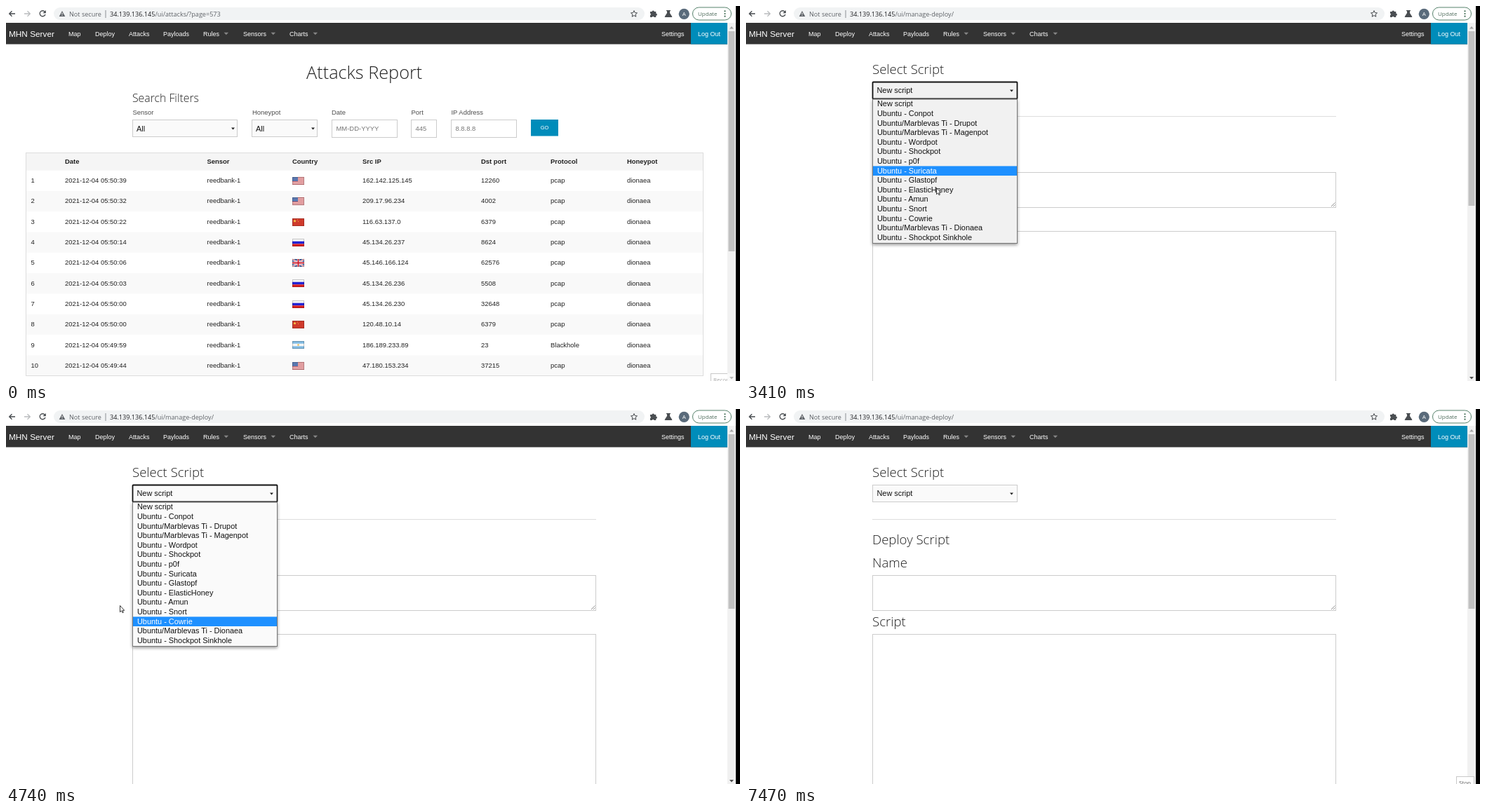
An HTML page for the animation above (7550 ms loop, 1046 by 535 pixels).

```html
<!DOCTYPE html>
<html lang="en">
<head>
<meta charset="utf-8">
<title>Attack report and deploy page</title>
<style>
  html, body { margin: 0; width: 100%; height: 100%; overflow: hidden; background: #fff; }
  svg { display: block; width: 1046px; height: 535px; }
  text { font-family: "Liberation Sans", Arial, sans-serif; font-size: 9.45px; fill: #222; white-space: pre; }
  .ui { font-family: "Open Sans", "Noto Sans", sans-serif; font-size: 9.1px; fill: #5f6368; }
  .small { font-size: 8px; }
  .head { font-family: "Open Sans", "Noto Sans", sans-serif; font-weight: 300; font-size: 18.6px; }
  .h2 { font-size: 25.3px; text-anchor: middle; }
  .h4 { font-size: 15.8px; }
  .nav { font-size: 9px; fill: #fff; }
  .brand { font-size: 11.8px; fill: #fff; }
  .label { fill: #4d4d4d; }
  .hint { fill: #757575; }
  .b { font-weight: bold; }
  .pick { font-size: 10.9px; fill: #111; }
  .on { fill: #fff; }
  .line { fill: none; stroke: #45494d; stroke-width: 1.3; }
</style>
</head>
<body>
<svg id="stage" viewBox="0 0 1046 535"></svg>
<script>
const LOOP = 7550, TICK = 1000 / 15;
const HOST = '34.139.136.145';

const text = (x, y, s, cls = '', extra = '') => `<text x="${x}" y="${y}" class="${cls}" ${extra}>${s}</text>`;
const rect = (x, y, w, h, fill, extra = '') =>
  `<rect x="${x}" y="${y}" width="${w}" height="${h}" fill="${fill}" ${extra}/>`;
const box = (x, y, w, h, fill = '#fff', stroke = '#ccc', extra = '') =>
  rect(x + .5, y + .5, w - 1, h - 1, fill, `stroke="${stroke}" ${extra}`);
const path = (d, extra = '') => `<path d="${d}" ${extra}/>`;
const group = (id, body) => `<g id="${id}">${body}</g>`;
const caret = (x, y, w, h, fill) => path(`M${x} ${y}h${w}l${-w / 2} ${h}z`, `fill="${fill}"`);

// Menu entries: label, x, right edge of the hover area, caret x
const menu = [
  ['Map', 89, 117], ['Deploy', 127, 165], ['Attacks', 175, 214], ['Payloads', 224, 271],
  ['Rules', 281, 327, 310.5], ['Sensors', 338, 394, 377.5], ['Charts', 404, 454, 437.5], ['Settings', 934, 976]
];

function browserBar() {
  return rect(0, 0, 1040, 24, '#fff') + rect(68, 2, 842, 18, '#f1f3f4', 'rx="9"') +
    path('M13 11H5M8.5 7.2L4.7 11l3.8 3.8', 'class="line"') +
    path('M26 11h8M30.5 7.2l3.8 3.8-3.8 3.8', 'class="line" style="stroke:#babcbe"') +
    group('reload', path('M55.3 8.2A4 4 0 1 0 56 12', 'class="line"') + path('M56.8 6v4.3h-4.3z', 'fill="#45494d"')) +
    group('stop', path('M48.5 7.5l7 7m0-7l-7 7', 'class="line"')) +
    path('M80 7l4.3 8h-8.6z', 'fill="#5f6368"') + rect(79.5, 9.6, 1, 2.6, '#fff') + rect(79.5, 13, 1, 1, '#fff') +
    text(90, 14.5, 'Not secure', 'ui') + rect(141.5, 6, 1, 11, '#8b8f93') +
    `<text x="148" y="14.5" class="ui"><tspan fill="#202124">${HOST}</tspan><tspan id="url"></tspan></text>` +
    path('M895 6.6l1.3 3 3.2.3-2.4 2.1.7 3.2-2.8-1.7-2.8 1.7.7-3.2-2.4-2.1 3.2-.3z', 'class="line" style="stroke-width:1"') +
    path('M918 8h2.6a1.6 1.6 0 0 1 3.2 0h2.5v2.6a1.6 1.6 0 0 1 0 3.2V16h-2.7a1.6 1.6 0 0 0-3 0H918v-2.8a1.5 1.5 0 0 0 0-2.8z', 'fill="#4a4e52"') +
    path('M941 6h6v1.2h-1V10l3.2 5q.4 1-.6 1h-9.2q-1 0-.6-1l3.2-5V7.2h-1z', 'fill="#4a4e52"') +
    '<circle cx="966.3" cy="11.3" r="7.6" fill="#5a6b7b"/>' +
    text(966.3, 14.4, 'A', 'ui small', 'text-anchor="middle" style="fill:#fff"') +
    '<rect x="978.5" y="2" width="55" height="18" rx="9" fill="#fff" stroke="#55816a"/>' +
    text(986, 13.8, 'Update', 'ui small', 'style="fill:#4c6a5a"') +
    [7.3, 11, 14.7].map(y => `<circle cx="1024.5" cy="${y}" r="1.1" fill="#3f6b52"/>`).join('');
}

function menuBar() {
  return rect(0, 24, 1028, 30.5, '#333') + rect(0, 24, 0, 30.5, '#222', 'id="hover"') +
    text(4, 43.6, 'MHN Server', 'brand') +
    menu.map(([s, x, , c]) => text(x, 42.8, s, 'nav') + (c ? caret(c, 37.7, 6.6, 3.6, '#858585') : '')).join('') +
    rect(976, 24, 52, 30.5, '#008cba') + text(986, 42.8, 'Log Out', 'nav');
}

function scrollbar() {
  return rect(1028, 24, 12, 511, '#f1f1f1') + path('M1031 32.5h6l-3-3.4z', 'fill="#a3a3a3"') +
    rect(1029.5, 36, 9, 0, '#c1c1c1', 'id="thumb"') + caret(1031, 529, 6, 3.4, '#505050') +
    rect(1040, 0, 6, 535, '#000');
}

const flagArt = {
  us: () => rect(0, 0, 17, 11, '#f3e6e6') + [0, 2, 4, 6, 8, 10].map(y => rect(0, y, 17, 1, '#d0555a')).join('') +
    rect(0, 0, 8, 6, '#5a78b0'),
  cn: () => rect(0, 0, 17, 11, '#cf3a2c') + path('M3.5 1.5l.7 1.5 1.6.1-1.2 1 .4 1.5-1.5-.8-1.5.8.4-1.5-1.2-1 1.6-.1z', 'fill="#f5c84a"') +
    rect(7, 1.5, 1, 1, '#f0b040') + rect(8, 4, 1, 1, '#f0b040'),
  ru: () => rect(0, 0, 17, 4, '#f7f7f7') + rect(0, 3.7, 17, 3.7, '#2222d4') + rect(0, 7.4, 17, 3.6, '#d81f1f'),
  gb: () => rect(0, 0, 17, 11, '#2f4f96') + path('M0 0l17 11M17 0L0 11', 'stroke="#fff" stroke-width="2.2"') +
    path('M0 0l17 11M17 0L0 11', 'stroke="#cf3540" stroke-width=".8"') +
    path('M8.5 0v11M0 5.5h17', 'stroke="#fff" stroke-width="3.6"') +
    path('M8.5 0v11M0 5.5h17', 'stroke="#cf2030" stroke-width="2"'),
  ar: () => rect(0, 0, 17, 11, '#82bbe2') + rect(0, 3.7, 17, 3.6, '#f7f7f7') + '<circle cx="8.5" cy="5.5" r="1.3" fill="#e5bd55"/>'
};

// Time, flag, source, port
const attacks = [
  ['50:39', 'us', '162.142.125.145', 12260], ['50:32', 'us', '209.17.96.234', 4002],
  ['50:22', 'cn', '116.63.137.0', 6379], ['50:14', 'ru', '45.134.26.237', 8624],
  ['50:06', 'gb', '45.146.166.124', 62576], ['50:03', 'ru', '45.134.26.236', 5508],
  ['50:00', 'ru', '45.134.26.230', 32648], ['50:00', 'cn', '120.48.10.14', 6379],
  ['49:59', 'ar', '186.189.233.89', 23], ['49:44', 'us', '47.180.153.234', 37215]
];
const cols = [84, 286.5, 408, 508, 677, 776, 885];

function report() {
  const heads = ['Date', 'Sensor', 'Country', 'Src IP', 'Dst port', 'Protocol', 'Honeypot'];
  const rows = attacks.map(([time, flag, ip, port], i) => {
    const top = 234.7 + 29.3 * i, base = top + 17.4;
    const cells = ['2021-12-04 05:' + time, 'reedbank-1', '', ip, port, port === 23 ? 'Blackhole' : 'pcap', 'dionaea'];
    return (i % 2 ? rect(29, top, 964, 29.3, '#f9f9f9') : '') + text(35.5, base, i + 1) +
      cells.map((s, c) => s === '' ? '' : text(cols[c], base, s)).join('') +
      `<g transform="translate(408 ${Math.round(top + 9.2)})">${flagArt[flag]()}${box(0, 0, 17, 11, 'none', '#0003')}</g>`;
  }).join('');
  const labels = [['Sensor', 180.5], ['Honeypot', 351], ['Date', 464], ['Port', 577.5], ['IP Address', 634.5]];
  const select = (x, w) => box(x, 162, w, 25, '#fafafa') + text(x + 6, 178.5, 'All', 'pick') + caret(x + w - 9, 173.5, 5, 3, '#222');
  const input = (x, w, s) => box(x, 162, w, 26) + text(x + 6.5, 178.3, s, 'hint');
  return text(510.7, 104, 'Attacks Report', 'head h2') + text(180, 137.2, 'Search Filters', 'head h4') +
    labels.map(([s, x]) => text(x, 155.3, s, 'label')).join('') +
    select(180, 150) + select(350, 94) +
    input(464, 94, 'MM-DD-YYYY') + input(577, 37, '445') + input(634, 94, '8.8.8.8') +
    rect(748, 162, 39, 23.5, '#008cba') + text(767.5, 176.3, 'GO', '', 'text-anchor="middle" style="fill:#fff;font-size:7.5px"') +
    rect(28, 209.5, 966, 25.2, '#f5f5f5') + heads.map((s, i) => text(cols[i], 225.3, s, 'b')).join('') +
    rows + box(28, 209, 966, 319, 'none', '#ddd');
}

const PI = 'Ubuntu/Marblevas Ti - ', UB = 'Ubuntu - ';
const options = ['New script', UB + 'Conpot', PI + 'Drupot', PI + 'Magenpot',
  ...['Wordpot', 'Shockpot', 'p0f', 'Suricata', 'Glastopf', 'ElasticHoney', 'Amun', 'Snort', 'Cowrie'].map(s => UB + s),
  PI + 'Dionaea', UB + 'Shockpot Sinkhole'];
const LIST = { x: 181, y: 133, w: 205, row: 13.6 };

function deploy() {
  return text(180, 97, 'Select Script', 'head') +
    box(180, 108, 207, 25, '#fafafa', '#ccc', 'id="select"') +
    text(186.5, 124.3, 'New script', 'pick') + caret(376, 119.5, 5, 3, '#222') +
    rect(180, 157, 661, 1, '#ddd') +
    text(180, 193, 'Deploy Script', 'head') + text(180, 226, 'Name', 'head') +
    box(180, 237, 661, 51) + path('M834 286l5.5-5.5M837 286l2.5-2.5', 'stroke="#777" stroke-width=".8"') +
    text(180, 309.5, 'Script', 'head') + box(180, 321, 661, 230);
}

function dropdown() {
  const { x, y, w, row } = LIST;
  return rect(x - .5, y, w + 1, 205.5, '#fafafa', 'id="list" stroke="#777" style="filter:drop-shadow(0 2px 2px #0006)"') +
    rect(x, y, w, row, '#1e90ff', 'id="bar"') +
    options.map((s, i) => text(187, 143.4 + row * i, s, 'pick opt')).join('');
}

const tip = (x, w, s, color) => box(x, 524, w, 16, '#fff', '#c8c8c8') + text(x + 4, 536, s, 'ui small', `style="fill:${color}"`);

stage.innerHTML = rect(0, 0, 1046, 535, '#fff') + group('report', report()) + group('deploy', deploy()) +
  browserBar() + menuBar() + group('tipRecord', tip(1004, 35, 'Record', '#a8a8a8')) +
  scrollbar() + group('tipRecordEdge', rect(1028, 524, 10, 11, '#fff9')) + group('dropdown', dropdown()) +
  group('status', path('M-2 521.5h128q3 0 3 3v12H-2z', 'fill="#dee1e6" stroke="#c6c9ce"') +
    text(-3.8, 532, HOST + '/ui/manage-deploy/', 'ui', 'style="font-size:7.9px"')) +
  group('tipStop', tip(1012, 26, 'Stop', '#5a5a5a')) +
  group('cursor',
    path('M.5.5v9.2l2.1-1.9 1.5 3 1.3-.6-1.4-2.9h2.7z', 'id="arrow" fill="#fff" stroke="#222" stroke-width=".9"') +
    path('M2 6V1q.8-1.2 1.6 0v3.5l3.6.7q.8.3.8 1.3L7 11H3L.3 7.2q.2-1 1.7.3z', 'id="hand" fill="#fff" stroke="#222" stroke-width=".8"') +
    path('M-2 -4.5h4M0 -4.5v9M-2 4.5h4', 'id="beam" fill="none" stroke="#222"'));

const $ = id => document.getElementById(id);
const show = (id, on) => { $(id).style.display = on ? '' : 'none'; };
const opts = document.querySelectorAll('.opt');

// Pointer route: tick, x, y
const route = [
  [4, 887, 524], [5, 790, 390], [6, 683, 257], [8, 683, 257], [9, 585, 212], [10, 455, 152], [11, 354, 109], [13, 354, 109],
  [15, 290, 84], [17, 196, 52], [19, 145, 38], [21, 137, 37], [30, 137, 37], [32, 165, 58], [34, 222, 92], [36, 253, 109],
  [41, 253, 112], [46, 253, 112], [48, 260, 158], [50, 269, 234], [51, 271, 259], [54, 258, 332], [56, 215, 376], [58, 158, 370],
  [60, 110, 390], [62, 55, 350], [63, 48, 280], [64, 62, 180], [65, 115, 95], [66, 190, 45], [67, 352, 2], [68, 892, 80],
  [69, 690, 340], [70, 330, 303], [71, 162, 280], [72, 185, 210], [73, 232, 155], [74, 268, 125], [75, 290, 118],
  [80, 290, 118], [83, 330, 122], [86, 450, 210], [89, 600, 335], [91, 655, 373.5], [103, 655, 373.5],
  [104, 1003, 526], [105, 1015, 524], [107, 1026, 523]
];

function pointer(k) {
  const n = route.findIndex(p => p[0] >= k);
  if (n < 1) return route[n < 0 ? route.length - 1 : 0].slice(1);
  const [a, ax, ay] = route[n - 1], [b, bx, by] = route[n], f = (k - a) / (b - a);
  return [ax + (bx - ax) * f, ay + (by - ay) * f];
}

// The highlight trails the pointer by one tick and stays on the last row touched.
function activeRow(k) {
  for (let j = k - 1; j > 41; j--) {
    const [x, y] = pointer(j), i = Math.floor((y - LIST.y) / LIST.row);
    if (x > LIST.x && x < LIST.x + LIST.w && i >= 0 && i < options.length) return i;
  }
  return 0;
}

function draw(k) {
  const onDeploy = k >= 27, open = k >= 40 && k < 83, focused = k >= 40 && k < 110;
  show('report', !onDeploy);
  show('deploy', onDeploy);
  show('dropdown', open);
  show('tipRecord', k < 1);
  show('tipRecordEdge', k < 1);
  show('tipStop', k >= 111);
  show('status', k >= 19 && k < 38);
  show('stop', k >= 25 && k < 28);
  show('reload', k < 25 || k >= 28);
  $('url').textContent = k >= 26 ? '/ui/manage-deploy/' : '/ui/attacks/?page=573';
  $('thumb').setAttribute('height', onDeploy ? 249 : 314);

  const over = k >= 36 && k < 59, face = over ? '#f1f1f1' : '#fafafa';
  const sel = $('select');
  sel.setAttribute('fill', face);
  sel.setAttribute('stroke', focused ? '#111' : over ? '#999' : '#ccc');
  sel.setAttribute('stroke-width', focused ? 1.8 : 1);
  sel.setAttribute('rx', focused ? 1 : 0);
  $('list').setAttribute('fill', face);
  const row = activeRow(k);
  $('bar').setAttribute('y', LIST.y + LIST.row * row + .2);
  opts.forEach((o, i) => o.classList.toggle('on', i === row));

  const [px, py] = pointer(k - 1);
  const item = k > 4 && k < 92 && py > 24 && py < 54 && menu.find(([, x, end]) => px >= x - 10 && px < end);
  $('hover').setAttribute('x', item ? item[1] - 10 : 0);
  $('hover').setAttribute('width', item ? item[2] - item[1] + 10 : 0);

  const [x, y] = pointer(k);
  const inText = k >= 83 && k < 93 && x > 180 && x < 841 && (y > 321 || (y > 237 && y < 288));
  const onLink = !inText && item && k < 32;
  show('cursor', (k >= 4 && k < 93) || (k >= 104 && k < 108));
  show('beam', inText);
  show('hand', onLink);
  show('arrow', !inText && !onLink);
  $('cursor').setAttribute('transform', `translate(${x} ${y})`);
}

const start = performance.now();
let last = -1;
function loop() {
  const k = Math.floor(((performance.now() - start) % LOOP) / TICK);
  if (k !== last) draw(last = k);
  requestAnimationFrame(loop);
}
loop();
</script>
</body>
</html>
```
